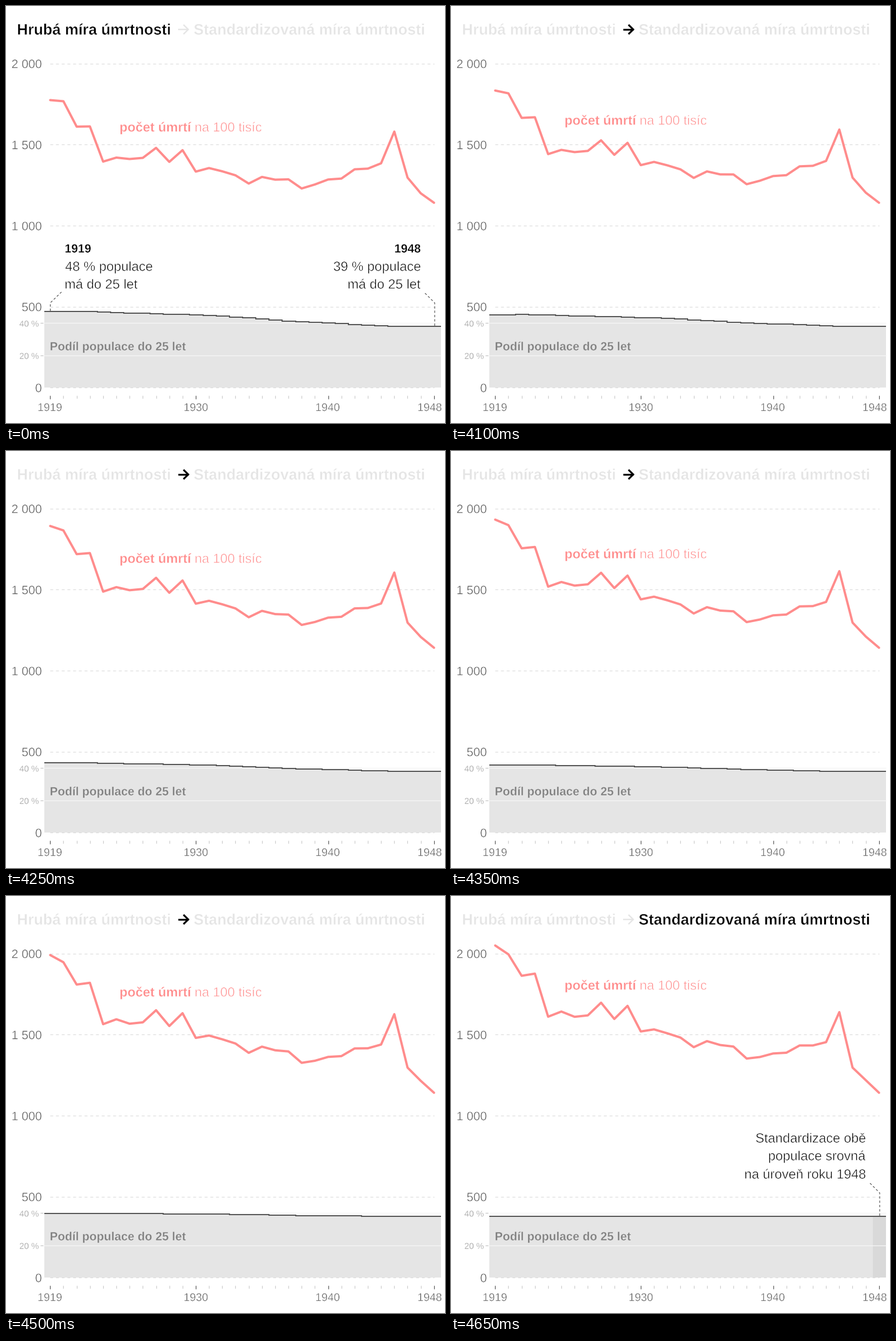
Write a matplotlib script that moves like this. It is 768 px wide and 729 px high and loops after 8.65 s.

```python
import numpy as np
import matplotlib.pyplot as plt
from matplotlib.animation import FuncAnimation
from matplotlib.patches import PathPatch, Rectangle
from matplotlib.textpath import TextPath
from matplotlib.transforms import Affine2D

W, H, DPI = 768, 729, 100
PX = 72 / DPI                      # one pixel in points
STEP_MS, FRAMES = 50, 173
HOLD, MORPH = 80, 14               # frames before the morph, steps in it

BLACK, PALE, DARK, PINK = "#000000", "#e5e5e5", "#555555", "#ff8c8c"
LEFT, RIGHT, BASE = 77.3, 748.8, 667

# Heights on the stage, one per year 1919-1948
CRUDE = np.array([
    164.5, 166.5, 210.9, 210.5, 272, 265, 267.5, 265.5, 248, 272.5,
    252, 289.5, 283.3, 289, 296, 310.4, 298.8, 303.6, 303, 319,
    312, 303.3, 301.7, 285.5, 284.3, 275, 219.5, 300, 327.5, 344])
STANDARD = np.array([
    86.5, 102, 139.5, 135.7, 211, 202, 211.2, 208.7, 186.5, 215,
    192, 236.8, 233.2, 240, 247.5, 264.3, 253.7, 260.5, 263.2, 284.2,
    281.5, 275.3, 274, 261.3, 261.3, 255.5, 203, 300, 322, 344])
YOUNG = np.array([
    534, 534, 533.5, 534.2, 535, 536, 536.7, 537.2, 537.8, 538.5,
    539.3, 540.2, 541.2, 542.4, 543.8, 545.3, 547, 549, 551, 552,
    553, 554.2, 555.3, 556.5, 557.5, 558.6, 559.8, 560.1, 560.2, 560.3])
LEVEL = np.full(30, 560.3)

fig = plt.figure(figsize=(W / DPI, H / DPI), dpi=DPI, facecolor="white")
ax = fig.add_axes([0, 0, 1, 1])
ax.axis("off")


def place(patch, x, y):
    patch.set_transform(Affine2D().scale(1, -1).translate(x, y) + ax.transData)


def text(x, y, s, size, color=BLACK, bold=False, align="left",
         thin=0.65, back="white"):
    """Text with its ink aligned to x and baseline y, thinned by an edge."""
    prop = {"family": "Liberation Sans", "weight": "bold" if bold else "normal"}
    path = TextPath((0, 0), s, size=size, prop=prop)
    box = path.get_extents()
    anchor = {"left": box.x0, "center": (box.x0 + box.x1) / 2, "right": box.x1}
    path = path.transformed(Affine2D().translate(-anchor[align], 0))
    patch = PathPatch(path, fc=color, ec=back, lw=thin * PX, zorder=6)
    ax.add_patch(patch)
    place(patch, x, y)
    return patch


def line(xs, ys, color, width=1, dash=None, **kw):
    style = (0, [d / width for d in dash]) if dash else "-"
    kw.setdefault("solid_capstyle", "butt")
    return ax.plot(xs, ys, color=color, lw=width * PX, ls=style, **kw)[0]


# Heading
title_crude = text(21, 50, "Hrubá míra úmrtnosti", 26.5, bold=True, thin=0.5)
title_std = text(329, 50, "Standardizovaná míra úmrtnosti", 26.5,
                 bold=True, thin=0.5)
arrow = [line([301, 318.5], [41, 41], PALE),
         line([310.5, 318.8, 310.5], [32.8, 41, 49.2], PALE,
              solid_joinstyle="miter")]

# Value axis
for y, label in [(100.5, "2 000"), (242.3, "1 500"), (384, "1 000"),
                 (525.5, "500"), (BASE, "0")]:
    line([LEFT, RIGHT], [y, y], "#dadada", 1.1, (5, 5), zorder=1)
    text(62, y + 8, label, 21.3, DARK, align="right", thin=0.5)

# Share axis
for y, label in [(554, "40 %"), (610.5, "20 %")]:
    line([60, 65], [y, y], "#bbbbbb")
    line([67, 761], [y, y], "#f7f7f7", 1.3, zorder=4)
    text(57, y + 6.5, label, 15, "#8c8c8c", align="right", thin=0.4)

# Time axis
years = np.linspace(LEFT, RIGHT, 30)
for i, x in enumerate(years):
    major = i in (0, 11, 21, 29)
    line([x, x], [680.5, 686.5 if major else 685.5],
         DARK if major else "#cccccc", 1.2)
for x, label in [(77, "1919"), (332.5, "1930"), (563, "1940"), (741.5, "1948")]:
    text(x, 708, label, 19.3, DARK, align="center", thin=0.5)

# Share of the young population
edges = np.linspace(67, 761, 31)
area = ax.stairs(YOUNG, edges, baseline=BASE, fill=True, color=PALE, lw=0,
                 zorder=2)
rim = ax.stairs(YOUNG, edges, baseline=None, color=DARK, lw=2 * PX, zorder=5)
text(78, 602, "Podíl populace do 25 let", 20.8, "#7f7f7f", bold=True,
     thin=0.4, back=PALE)

# Mortality curve and its label
curve = line(years, CRUDE, PINK, 4, zorder=5, solid_capstyle="round",
             solid_joinstyle="round")
label_bold = text(200, 219.5, "počet úmrtí", 23, PINK, bold=True, thin=0.4)
label_light = text(331.5, 219.5, "na 100 tisíc", 23, PINK)


def callout(xs, ys):
    return line(xs, ys, "#444444", 1.1, (4, 3.5), zorder=6)


right_lead = callout([750, 750, 731], [559, 519, 500])
before = [
    callout([77.5, 77.5, 97], [533, 519, 500]),
    text(104, 431, "1919", 20.8, bold=True, thin=0.4),
    text(104, 463, "48 % populace", 23.2),
    text(104, 494, "má do 25 let", 23.2),
    text(725, 431, "1948", 20.8, bold=True, align="right", thin=0.4),
    text(725, 463, "39 % populace", 23.2, align="right"),
    text(725, 494, "má do 25 let", 23.2, align="right"),
]
after = [
    text(725, 431, "Standardizace obě", 23.2, align="right"),
    text(725, 462, "populace srovná", 23.2, align="right"),
    text(725, 494, "na úroveň roku 1948", 23.2, align="right"),
    ax.add_patch(Rectangle((737.7, 560.3), 23.3, BASE - 560.3,
                           fc="#d9d9d9", ec="none", zorder=3)),
]

ax.set_xlim(0, W)
ax.set_ylim(H, 0)


def update(n):
    p = min(max((n - HOLD + 1) / MORPH, 0), 1)
    first, last = p == 0, p == 1
    moving = not (first or last)

    title_crude.set_facecolor(BLACK if first else PALE)
    title_std.set_facecolor(BLACK if last else PALE)
    for part in arrow:
        part.set_color(BLACK if moving else PALE)
        part.set_linewidth((3.2 if moving else 2.4) * PX)

    curve.set_ydata(CRUDE + (STANDARD - CRUDE) * p)
    share = YOUNG + (LEVEL - YOUNG) * p
    area.set_data(values=share)
    rim.set_data(values=share)
    baseline = 219.5 - 55.7 * p
    place(label_bold, 200, baseline)
    place(label_light, 331.5, baseline)

    right_lead.set_visible(not moving)
    for artist in before:
        artist.set_visible(first)
    for artist in after:
        artist.set_visible(last)
    return []


anim = FuncAnimation(fig, update, frames=FRAMES, interval=STEP_MS,
                     init_func=lambda: update(0), repeat=True, repeat_delay=0)
plt.show()
```
